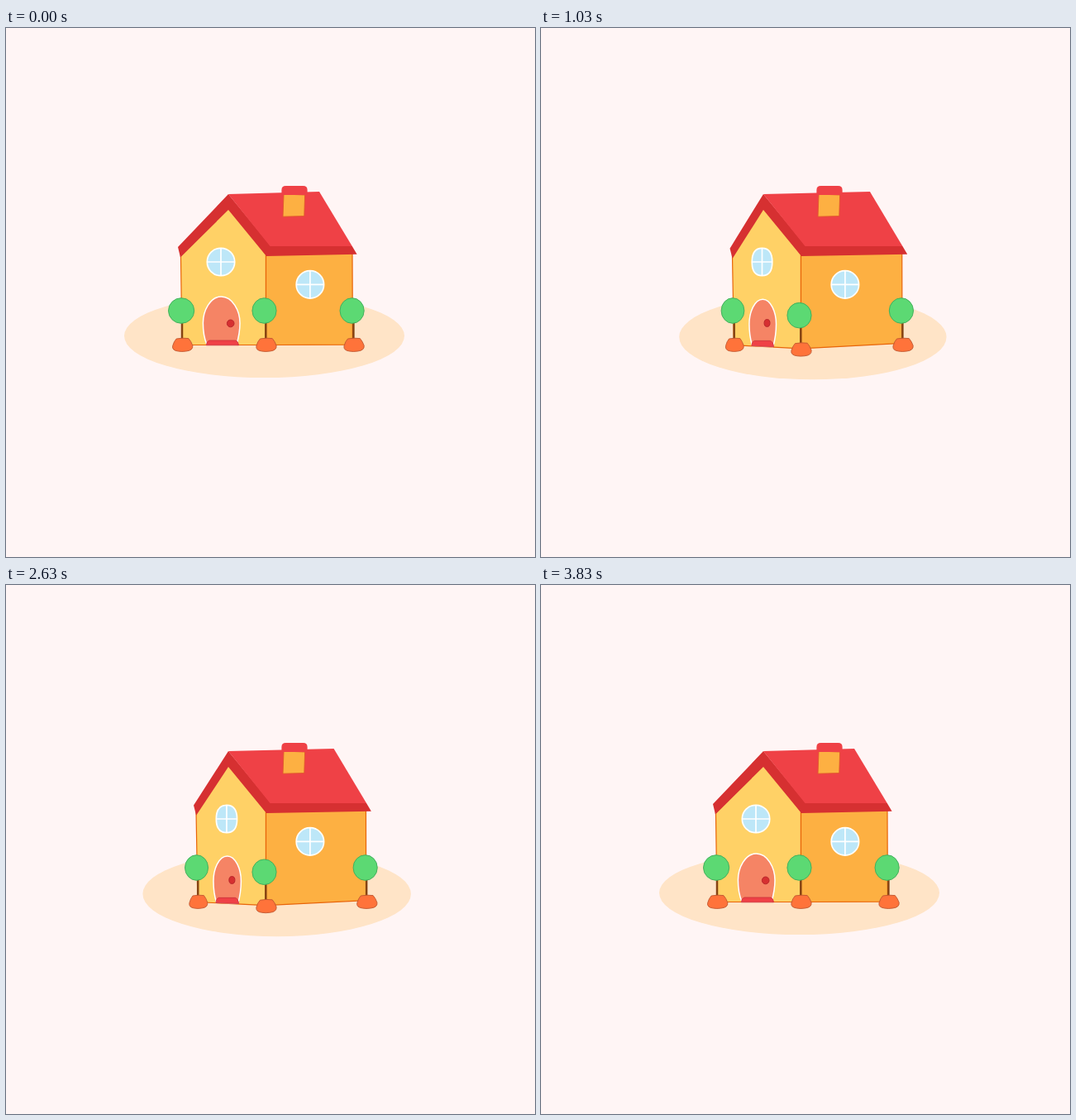
Recreate the animation shown at these times as an HTML page. Size 640 by 640 pixels, loop 4010 ms.

```html
<!DOCTYPE html>
<html lang="en">
<head>
<meta charset="utf-8">
<title>Turning house</title>
<style>
  html, body { margin: 0; width: 100%; height: 100%; overflow: hidden; background: #fff5f5; }
  svg { display: block; width: 100vw; height: 100vh; }
</style>
</head>
<body>
<svg id="stage" viewBox="0 0 640 640"></svg>
<script>
const LOOP = 4010, HALF = 1915;
const RED = '#ef4146', DARK = '#d63031', GOLD = '#fdb042', EDGE = '#e8650a';
const stage = document.getElementById('stage');

// Cubic Bezier easing with handles (x1, 0) and (x2, 1)
function ease(x, x1, x2) {
  let lo = 0, hi = 1;
  for (let i = 0; i < 24; i++) {
    const s = (lo + hi) / 2, r = 1 - s;
    if (3 * s * r * r * x1 + 3 * s * s * r * x2 + s * s * s < x) lo = s; else hi = s;
  }
  return lo * lo * (3 - 2 * lo);
}

// How far the house is turned: 0 = front, 1 = side
function turn(t) {
  if (t < HALF) return ease(t / HALF, .65, .33);
  return t < 2 * HALF ? 1 - ease(t / HALF - 1, .36, .42) : 0;
}

const path = (d, fill, stroke = 'none', width = 1) =>
  `<path d="${d}" fill="${fill}" stroke="${stroke}" stroke-width="${width}" stroke-linejoin="round"/>`;

const oval = (cx, cy, rx, ry, fill, stroke = 'none') =>
  `<ellipse cx="${cx}" cy="${cy}" rx="${rx}" ry="${ry}" fill="${fill}" stroke="${stroke}"/>`;

// Round pane that squares off as it narrows
function pane(cx, cy, rx, kx, ky) {
  const r = 16.7, hx = rx * kx, hy = r * ky;
  return path(`M${cx} ${cy - r}c${hx} 0 ${rx} ${r - hy} ${rx} ${r}s${hx - rx} ${r} ${-rx} ${r}
    s${-rx} ${hy - r} ${-rx} ${-r}s${rx - hx} ${-r} ${rx} ${-r}z`, '#bde7f8', '#fff', 1.7) +
    path(`M${cx} ${cy - r}v${2 * r}M${cx - rx} ${cy}h${2 * rx}`, 'none', '#fff', 1.7);
}

function tree(x, y, rx, potX, potScale) {
  const trunk = potX - .6 * potScale;
  return path(`M${trunk} ${y + 12}V${y + 36}`, 'none', '#854312', 2.5) +
    oval(x, y, rx, 15.3, '#5cd973', '#43b05c') +
    `<g transform="translate(${potX} ${y + 41.2}) scale(${potScale} 1)">` +
    path('M-7.5-7.2Q0-8.6 7.3-7.6Q10.5-4 12.2 1Q13 7 4 7.9Q-1 8.6-5 7.9Q-13 7-12 1.5Q-10.5-4-7.5-7.2Z',
      '#ff733a', '#bf5630', .9) + '</g>';
}

function draw(p) {
  const mix = (a, b) => a + (b - a) * p;
  // Blend two paths with the same commands
  const morph = (a, b) => {
    const end = b.match(/[\d.]+/g);
    let i = 0;
    return a.replace(/[\d.]+/g, n => mix(+n, +end[i++]));
  };

  const ground = oval(mix(312.5, 338.5), mix(372.6, 374.6), mix(169.5, 157.1), mix(50.5, 52), '#ffe4c7');

  const walls = path(morph('M211.4 272L269 215L314.5 274V383.5L213 383.5Z',
                           'M243.3 275L269 215L314.5 274V390.6L245.4 383.6Z'), '#ffd166', EDGE, 1.2) +
    path(morph('M314.5 274L419 272L419.4 383.2L314.5 383.5Z',
               'M314.5 274L447.2 272L447.3 380.4L314.5 390.6Z'), GOLD, EDGE, 1.2);

  const roof = path(morph('M269 201L208 265L211 277.5L269 220L315 276L424.6 273.7L418.8 264L319 262Z',
                          'M269 201L240.6 267.6L243.8 279.7L269 220L315 276L454.2 273.7L448.4 264L319 262Z'), DARK) +
    path(morph('M269 201L379 198L418.8 264L319.5 264Z',
               'M269 201L409.1 198L448.4 264L319.5 264Z'), RED);

  const chimney = path('M336 201L361.6 202L360.8 227.6L335 228.2Z', GOLD, '#e0562c', .9) +
    path('M333.4 202V196Q333.4 191 338.4 191H359.6Q364.6 191 364.6 196V202Z', RED);

  const door = path(morph(
      'M260.5 325C274 325 283 342 283 357C283 367 281 376 279 383L243 383C240 376 238.4 367 238.4 357C238.4 342 247 325 260.5 325Z',
      'M272.8 330C280.5 330 285.4 345 285.4 359C285.4 370 284 379 281.8 386.8L263 384.6C261 377 259.9 368 259.9 359C259.9 345 265 330 272.8 330Z'),
      '#f58465', '#fff', 1.5) +
    oval(mix(271.7, 274.6), mix(357.4, 356.7), mix(4.3, 3), 4.4, DARK, '#b9282c') +
    path(morph('M246 378L278 378Q281 379 281.5 383.8L242.4 383.8Q242.6 379 246 378Z',
               'M265.5 378.6L277 378.6Q280.8 380 281.7 386.8L262.2 385Q262.6 379.6 265.5 378.6Z'), RED, '#c9303a', .8);

  stage.innerHTML = ground + walls + roof + chimney +
    pane(mix(260, 271.9), 283, mix(16.7, 9.7), mix(.552, .7), mix(.552, .82)) +
    pane(367.9, 310.4, 16.7, .552, .552) + door +
    tree(mix(212.1, 243.7), 342, mix(15.6, 12.9), mix(213.6, 246.4), mix(1, .84)) +
    tree(312.5, mix(342, 351), 14.6, 314.9, 1) +
    tree(mix(418.6, 446.1), 342, 14.6, mix(421, 448), 1);
}

function tick() {
  draw(turn(performance.now() % LOOP));
  requestAnimationFrame(tick);
}
tick();
</script>
</body>
</html>
```
